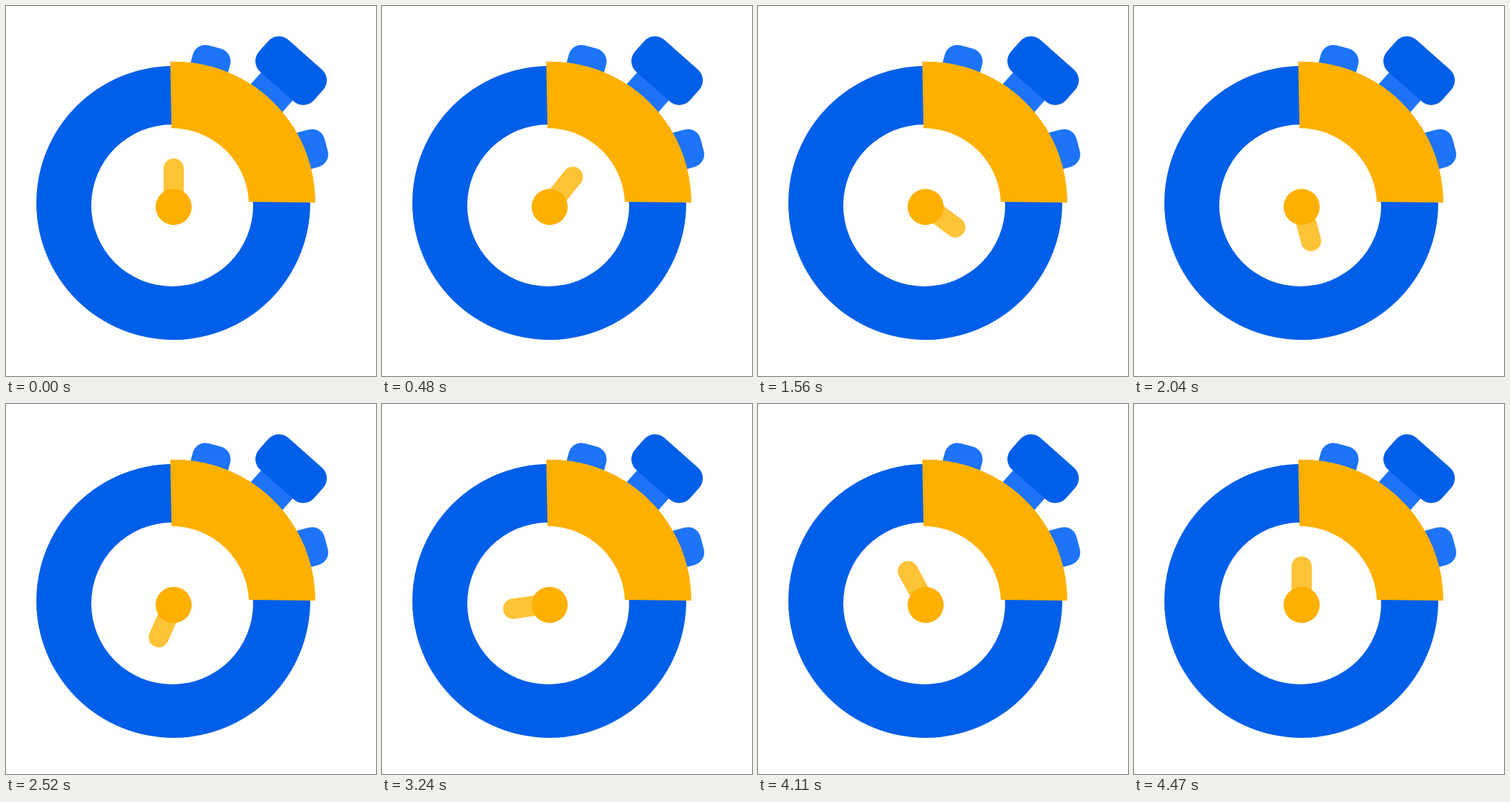
These frames come from a looping animation (512x512 px, 4500 ms). An HTML page:

```html
<!DOCTYPE html>
<html>
<head>
<meta charset="utf-8">
<title>Stopwatch</title>
<style>
  html, body { margin: 0; height: 100%; overflow: hidden; background: #fff; }
  svg { display: block; width: 100vw; height: 100vh; }
  .blue { fill: #005fe8; }
  .light { fill: #1e74f8; }
  .amber { fill: #fdb000; }
</style>
</head>
<body>
<svg viewBox="0 0 512 512">
  <!-- buttons -->
  <g class="light">
    <rect transform="rotate(15)" x="267.1" y="-19.9" width="53.5" height="60" rx="18"/>
    <rect transform="rotate(-15)" x="318" y="273.6" width="60.2" height="53.5" rx="18"/>
  </g>
  <g transform="translate(394.5 89.5) rotate(41.5)">
    <rect class="light" x="-29.5" y="20" width="58.5" height="70"/>
    <rect class="blue" x="-50.9" y="-29.5" width="101.8" height="59" rx="20"/>
  </g>
  <!-- dial -->
  <circle class="blue" cx="231.5" cy="272.5" r="189.5"/>
  <circle fill="#fff" cx="230" cy="276" r="112"/>
  <path class="amber" d="M227.3 77A195 195 0 0 1 428 272L336 271A107 107 0 0 0 229 169Z"/>
  <!-- hand and hub -->
  <path id="hand" d="M232 276V225" stroke="#ffc338" stroke-width="28" stroke-linecap="round"/>
  <circle class="amber" cx="232" cy="278" r="25"/>
</svg>
<script>
  const LOOP = 4500, TURN = 4470;
  const hand = document.getElementById('hand');

  function draw() {
    const p = Math.min(1, performance.now() % LOOP / TURN);
    const angle = 360 * p + 0.8 * Math.sin(Math.PI * p);
    hand.setAttribute('transform', `rotate(${angle} 232 276)`);
    requestAnimationFrame(draw);
  }
  draw();
</script>
</body>
</html>
```
